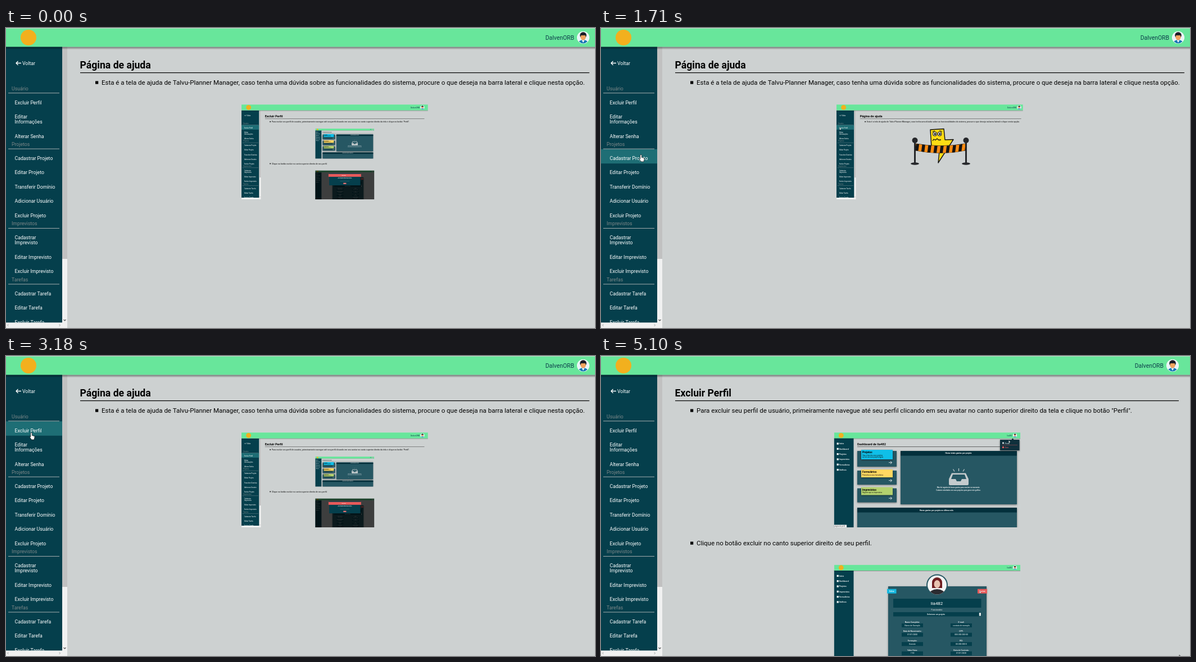
An HTML page with a canvas that plays this animation: 1048 px wide and 534 px high, repeating every 5.18 s.

```html
<!DOCTYPE html>
<html lang="pt">
<head>
<meta charset="utf-8">
<title>Página de ajuda</title>
<style>
html, body { margin: 0; width: 100%; height: 100%; overflow: hidden; background: #cdd1d1; }
canvas { display: block; width: 100%; height: 100%; }
</style>
</head>
<body>
<canvas id="stage" width="1048" height="534"></canvas>
<script>
const g = document.getElementById('stage').getContext('2d');
const W = 1048, H = 534, LOOP = 5180, STEP = 77.4;
const K = 0.3166; // an embedded screen relative to the page
const BG = '#cdd1d1', DARK = '#053f4c', TEAL = '#265763', DEEP = '#04303c', RED = '#e85a5a', GREEN = '#68e69b';
const USER = 'DalvenORB', MEMBER = 'lia482';

const MENU = [
  ['Usuário', 'Excluir Perfil', 'Editar|Informações', 'Alterar Senha'],
  ['Projetos', 'Cadastrar Projeto', 'Editar Projeto', 'Transferir Domínio', 'Adicionar Usuário', 'Excluir Projeto'],
  ['Imprevistos', 'Cadastrar|Imprevisto', 'Editar Imprevisto', 'Excluir Imprevisto'],
  ['Tarefas', 'Cadastrar Tarefa', 'Editar Tarefa', 'Excluir Tarefa']
];

// time, x, y of the pointer tip
const POINTER = [
  [77, 962, 520], [542, 198, 250], [700, 130, 215], [774, 107, 197], [851, 104, 190], [1083, 95.5, 174],
  [1400, 88, 168], [1620, 78, 195], [1703, 71, 225.5], [1900, 66, 290], [2100, 60, 328], [2250, 58, 330],
  [2399, 52, 253], [2560, 48, 215], [2710, 46, 168], [2787, 45, 137], [2940, 41, 136], [3173, 45, 136.5],
  [3484, 45, 136.5], [3560, 60, 150], [3793, 283, 207], [4010, 480, 290], [4560, 990, 512],
  [4650, 1010, 525], [5108, 1029, 532]
];
const MINI_POINTER = [[1080, 921, 493], [1400, 300, 260], [1620, 19, 130]];

const HAND = new Path2D('M0 0C1.2 0 1.4 1 1.4 2V5L5 6C6 6.4 6.2 7 6 8L5 12.5H.5L-2.4 8.4C-3.2 7-2.2 6.6-1.2 7.6V2C-1.2.8-1 0 0 0Z');
const ARROW = new Path2D('M0 0V9L2.2 7.2L3.8 10.6L5.2 10L3.7 6.7H6.4Z');

function rect(x, y, w, h, color) {
  g.fillStyle = color;
  g.fillRect(x, y, w, h);
}

function disc(x, y, r, color) {
  g.fillStyle = color;
  g.beginPath();
  g.arc(x, y, r, 0, 7);
  g.fill();
}

function text(str, x, y, size, color, align = 'left', weight = 400) {
  g.font = `${weight} ${size}px Roboto, sans-serif`;
  g.fillStyle = color;
  g.textAlign = align;
  g.fillText(str, x, y);
}

function trace(points, close) {
  g.beginPath();
  points.forEach(([x, y]) => g.lineTo(x, y));
  if (close) g.closePath();
}

function line(points, color, width) {
  trace(points);
  g.strokeStyle = color;
  g.lineWidth = width;
  g.stroke();
}

function box(x, y, w, h, color) {
  g.save();
  g.shadowColor = 'rgba(0,0,0,.45)';
  g.shadowBlur = 3;
  g.shadowOffsetY = 1;
  rect(x, y, w, h, color);
  g.restore();
}

function screen(x, y, paint) {
  g.save();
  g.translate(x, y);
  g.scale(K, K);
  g.beginPath();
  g.rect(0, 0, W, H);
  g.clip();
  paint();
  g.restore();
}

function pointAt(keys, t) {
  if (t < keys[0][0] - 1) return null;
  const i = keys.findIndex(k => k[0] > t);
  if (i < 0) return keys[keys.length - 1].slice(1);
  if (i === 0) return keys[0].slice(1);
  const [t0, x0, y0] = keys[i - 1], [t1, x1, y1] = keys[i];
  const p = (t - t0) / (t1 - t0);
  return [x0 + (x1 - x0) * p, y0 + (y1 - y0) * p];
}

function pointer(x, y, shape, scale = 1) {
  g.save();
  g.translate(x, y);
  g.scale(scale, scale);
  g.fillStyle = '#fff';
  g.fill(shape);
  g.strokeStyle = '#111';
  g.lineWidth = 0.7;
  g.stroke(shape);
  g.restore();
}

function avatar(x) {
  g.save();
  disc(x, 17, 11, '#fff');
  g.beginPath();
  g.arc(x, 17, 10.4, 0, 7);
  g.clip();
  rect(x - 11, 6, 22, 22, '#e9f3f8');
  g.fillStyle = '#1877b5';
  g.beginPath();
  g.ellipse(x, 28, 9, 7, 0, 0, 7);
  g.fill();
  trace([[x - 2.5, 21.5], [x + 2.5, 21.5], [x, 26]], true);
  g.fillStyle = '#fff';
  g.fill();
  disc(x, 13, 5.8, '#1d1d26');
  g.fillStyle = '#f3a45f';
  g.beginPath();
  g.ellipse(x, 16.2, 4.6, 5.2, 0, 0, 7);
  g.fill();
  rect(x - 4.6, 9.5, 9, 3.6, '#1d1d26');
  g.restore();
}

function header(name, x) {
  const shade = g.createLinearGradient(0, 33.5, 0, 38.5);
  shade.addColorStop(0, 'rgba(0,0,0,.45)');
  shade.addColorStop(1, 'rgba(0,0,0,0)');
  rect(0, 33.5, W, 5, shade);
  rect(0, 0, W, 33.5, GREEN);
  rect(0, 0, W, 0.8, '#d3dad6');
  disc(40, 17, 14, '#f2b01e');
  text(name, x - 16, 21, 10.4, '#0b3d4a', 'right');
  avatar(x);
}

function sidebar(cur, focused) {
  g.save();
  g.beginPath();
  g.rect(0, 33, 100, 491.5);
  g.clip();
  rect(0, 33, 100, 492, DARK);
  line([[27, 62.5], [18, 62.5]], '#fff', 1.3);
  line([[21.5, 59], [18, 62.5], [21.5, 66]], '#fff', 1.3);
  text('Voltar', 29, 66.2, 8.73, '#fff');
  let y = 116.3;
  MENU.forEach(([title, ...items], group) => {
    text(title, 10, y - 5.8, 8.73, '#7d8788');
    const top = y;
    items.forEach((item, i) => {
      const lines = item.split('|');
      const h = lines.length > 1 ? 34.5 : 25.5;
      const over = cur && cur[0] < 100 && cur[1] >= y && cur[1] < y + h;
      if (over || (focused && group + i === 0)) rect(0, y, 100, h, '#1e6e75');
      lines.forEach((s, n) => {
        text(s, 15.5, y + h / 2 + 6.5 + (n - (lines.length - 1) / 2) * 8.9, 8.73, '#fff');
      });
      y += h;
    });
    rect(4, top - 1.1, 91, 1.1, '#97a3a5');
    y += 13.9;
  });
  g.restore();

  const grabbed = cur && cur[0] >= 100 && cur[0] < 109;
  rect(100, 33, 9, 492, '#f1f1f1');
  rect(100, 33, 9, 378, grabbed ? '#a8a8a8' : '#c1c1c1');
  rect(0, 524.5, 109, 9.5, '#f1f1f1');
  line([[102.5, 519], [104.5, 521], [106.5, 519]], '#505050', 1.1);
  line([[4.5, 527], [2.5, 529], [4.5, 531]], '#a3a3a3', 1);
  line([[94.5, 527], [96.5, 529], [94.5, 531]], '#a3a3a3', 1);
}

function heading(str, ruleEnd) {
  text(str, 131.6, 72, 17.6, '#000', 'left', 700);
  rect(132, 79, ruleEnd - 132, 1.2, '#000');
}

function bullet(str, y) {
  rect(159, y - 2.5, 5.2, 5.2, '#000');
  text(str, 170, y + 4, 11.49, '#000');
}

// Frame shared by both embedded screens
function shell() {
  g.beginPath();
  g.rect(414.6, 136, W * K, H * K);
  g.clip();
  rect(414, 136, 333, 170, BG);
  rect(414.6, 146, 34.9, 160, DARK);
  ['Início', 'Dashboard', 'Projetos', 'Imprevistos', 'Formulários', 'Gráficos'].forEach((s, i) => {
    const y = 156 + i * 9.3;
    rect(419.6, y - 1.6, 3.2, 3.2, '#fff');
    text(s, 423.7, y + 1.3, 3.5, '#fff', 'left', 500);
  });
  screen(414.6, 136, () => header(MEMBER, 1017));
}

function taskCard(y, h, color, title, lines) {
  box(456, y, 70, h, TEAL);
  box(463, y - 2, 56, lines.length > 1 ? 17 : 14, color);
  text(title, 465, y + 4, 4.7, '#000', 'left', 700);
  lines.forEach((s, i) => text(s, 465, y + 8.5 + i * 3, 2.8, '#111'));
  const a = y + h - 7.3;
  line([[512, a], [517.5, a]], '#fff', 0.8);
  line([[515, a - 2.4], [517.5, a], [515, a + 2.4]], '#fff', 0.8);
}

function tray() {
  g.fillStyle = '#c4cbcd';
  g.beginPath();
  g.roundRect(619, 218, 35, 12, 2);
  g.fill();
  trace([[624, 208.5], [649, 208.5], [654, 219], [619, 219]], true);
  g.fill();
  trace([[626, 211], [647, 211], [650, 219], [642, 219], [640, 223], [633, 223], [631, 219], [623, 219]], true);
  g.fillStyle = TEAL;
  g.fill();
  [[626.5, 201.5, 629, 205.5], [636.5, 200, 636.5, 205], [646.5, 201.5, 644, 205.5]]
    .forEach(([a, b, c, d]) => line([[a, b], [c, d]], '#c4cbcd', 1.2));
}

function dashboard(menuOpen, cur) {
  text('Dashboard de ' + MEMBER, 456, 158.5, 5.5, '#000', 'left', 700);
  rect(456, 161.4, 284, 0.6, '#222');
  taskCard(169, 28, '#0fbfe8', 'Projetos', ['Veja a lista dos seus projetos', 'ou crie um novo projeto agora']);
  taskCard(204, 25, '#ffd761', 'Formulários', ['Preencha os seus formulários']);
  taskCard(235.5, 25, '#b3d16e', 'Imprevistos', ['Registre aqui os imprevistos']);

  box(533, 169, 207, 95, TEAL);
  rect(533, 169, 207, 8.5, DEEP);
  text('Horas totais gastas por projeto', 636, 174.4, 3.4, '#fff', 'center', 700);
  tray();
  text('Não há registro de horas gastas para mostrar no momento.', 636, 235, 2.9, '#fff', 'center', 500);
  text('Cadastre atividades em seus projetos para gerar este gráfico.', 636, 239.5, 2.9, '#fff', 'center', 500);
  box(456, 270, 284, 36, TEAL);
  rect(456, 270, 284, 8.5, DEEP);
  text('Horas gastas por projeto no último mês', 597, 275.6, 3.4, '#fff', 'center', 700);

  if (menuOpen) {
    trace([[730, 149.5], [732.5, 146.5], [735, 149.5]], true);
    g.fillStyle = '#10303c';
    g.fill();
    box(710, 149, 34.5, 19, '#10303c');
    disc(715.5, 155, 1.4, '#fff');
    text('Perfil', 718.5, 156.6, 3.8, '#fff');
    rect(713, 158.6, 28, 0.4, RED);
    disc(715.5, 162.5, 1.7, RED);
    text('Sair', 718.5, 164, 3.8, RED);
    rect(414.6, 300.5, 22.5, 4.5, '#f4f4f4');
    text('página do perfil', 415.6, 303.6, 2.7, '#444');
    pointer(726, 150, HAND, K);
  } else if (cur) {
    pointer(cur[0], cur[1], ARROW, K);
  }
}

function button(x, y, w, h, color, label) {
  rect(x, y, w, h, color);
  text(label, x + w / 2, y + h / 2 + 1.3, 3.5, '#fff', 'center', 500);
}

// Drawn in place of the second embedded screen
function profile(modal) {
  box(511, 410, 175, 140, TEAL);
  disc(598, 407.5, 19, TEAL);
  g.save();
  disc(598, 407.5, 17, '#f4f4f4');
  g.beginPath();
  g.arc(598, 407.5, 17, 0, 7);
  g.clip();
  disc(598, 403, 9, '#6f1d20');
  rect(589, 403, 18, 10, '#6f1d20');
  g.fillStyle = '#e9c3b0';
  g.beginPath();
  g.ellipse(598, 406, 5.5, 7, 0, 0, 7);
  g.fill();
  g.fillStyle = '#2b2b30';
  g.beginPath();
  g.ellipse(598, 424, 14, 9, 0, 0, 7);
  g.fill();
  g.restore();
  button(509, 414.7, 16.5, 8, '#16b8e0', 'Editar');
  button(670, 414.7, 17, 8, RED, 'Excluir');

  rect(520, 432, 156.5, 16, DARK);
  text(MEMBER, 597.5, 443, 8, '#fff', 'center');
  text('Funcionário', 597.5, 453.3, 3.8, '#fff', 'center');
  rect(520, 456, 156.5, 7.5, DARK);
  text('Selecione um projeto', 596, 461, 3.4, '#fff', 'center', 500);
  rect(672.8, 457, 3.2, 5.6, '#dfe5e5');
  [
    ['Nome Completo:', 'Nome de Exemplo', 'E-mail:', 'contato de exemplo'],
    ['Data de Nascimento:', '01/01/2000', 'CPF:', '000.000.000-00'],
    ['Formação:', 'Gerente', 'RG:', '00.000.000-0'],
    ['Valor Hora:', '7.50', 'Data de Contrato:', '01/01/2020']
  ].forEach((row, i) => {
    const y = 476 + i * 16.6;
    [554, 641].forEach((x, n) => {
      text(row[n * 2], x, y - 1.2, 3.5, '#fff', 'center', 500);
      rect(x - 19, y, 38, 7, DARK);
      text(row[n * 2 + 1], x, y + 4.6, 3.4, '#fff', 'center');
    });
  });

  if (!modal) {
    pointer(674, 418, HAND, K);
    return;
  }
  rect(414, 371, 333, 170, 'rgba(0,0,0,.7)');
  rect(493, 387.5, 175, 67.5, DARK);
  rect(489, 391, 183, 16, RED);
  text('Exclusão', 575, 401, 5.6, '#fff', 'center', 700);
  text('×', 665, 400.8, 4.5, '#9c3038', 'center');
  text('Tem certeza que deseja excluir sua conta?', 580.5, 413.7, 4, '#fff', 'center');
  text('Caso sim, digite confirmar e clique em excluir', 580.5, 418, 4, '#fff', 'center');
  rect(554, 431, 53, 0.6, '#c5d0d2');
  button(572, 441, 17, 7, RED, 'Excluir');
}

function helpBody(media) {
  heading('Página de ajuda', 1038);
  bullet('Esta é a tela de ajuda de Talvu-Planner Manager, caso tenha uma dúvida sobre as funcionalidades do sistema, procure o que deseja na barra lateral e clique nesta opção.', 97);
  if (media) media();
}

function profileBody(s) {
  heading('Excluir Perfil', 1028);
  bullet('Para excluir seu perfil de usuário, primeiramente navegue até seu perfil clicando em seu avatar no canto superior direito da tela e clique no botão "Perfil".', 97);
  bullet('Clique no botão excluir no canto superior direito de seu perfil.', 333);
  g.save();
  shell();
  dashboard(s.menuOpen, s.dashCur);
  g.restore();
  if (!s.second) return;
  g.save();
  g.translate(0, 235.4);
  shell();
  g.translate(0, -235.4);
  profile(s.modal);
  g.restore();
}

function page(s) {
  rect(0, 0, W, H, BG);
  if (s.perfil) profileBody(s);
  else helpBody(s.media);
  sidebar(s.cur, s.focused);
  header(USER, s.perfil ? 1017 : 1027);
  if (s.cur) pointer(s.cur[0], s.cur[1], s.cur[0] < 100 ? HAND : ARROW);
}

function bolt() {
  g.lineJoin = 'round';
  trace([[586, 181], [610, 179.5], [612, 199], [627, 198.5], [600, 240], [602, 219], [588, 212]], true);
  g.fillStyle = '#ffdc14';
  g.fill();
  g.strokeStyle = '#111';
  g.lineWidth = 1.4;
  g.stroke();
  [594, 602.5].forEach(x => {
    disc(x, 188.5, 3.9, '#111');
    disc(x, 188.5, 2.9, '#e8e8e0');
    disc(x + 0.3, 188.8, 1.8, '#111');
  });
  line([[589.5, 185], [594, 183]], '#111', 1);
  line([[602, 182.5], [607, 184.5]], '#111', 1);
  line([[590, 201], [592, 198], [595, 199.5], [598, 197], [601, 199.5], [605, 199]], '#111', 1.3);

  [558.5, 649.5].forEach(x => {
    disc(x, 200, 5, '#26282b');
    rect(x - 1.5, 203, 3, 38, '#26282b');
    g.beginPath();
    g.ellipse(x, 241.5, 7.5, 2.2, 0, 0, 7);
    g.fill();
  });

  g.save();
  g.beginPath();
  g.moveTo(560, 206);
  g.quadraticCurveTo(604, 213.5, 648, 206);
  g.lineTo(648, 218);
  g.quadraticCurveTo(604, 227, 560, 218);
  g.closePath();
  g.strokeStyle = '#111';
  g.lineWidth = 1;
  g.stroke();
  g.clip();
  rect(558, 204, 92, 22, '#ff8c12');
  for (let x = 561; x < 655; x += 11) {
    trace([[x, 204], [x + 5.5, 204], [x + 2.5, 226], [x - 3, 226]], true);
    g.fillStyle = '#151515';
    g.fill();
  }
  g.restore();
}

function mini(t, snapped) {
  const perfil = t < 850 || t >= 2950;
  screen(419, 136, () => page({
    perfil,
    focused: perfil,
    second: true,
    modal: t < 390 || t >= 2950,
    menuOpen: t >= 620 && t < 850,
    dashCur: t >= 2950 ? [602, 251] : null,
    cur: perfil ? null : pointAt(MINI_POINTER, snapped)
  }));
  if (!perfil) bolt();
}

function draw(now) {
  const t = now % LOOP;
  const snapped = Math.floor((t + 9) / STEP) * STEP;
  g.setTransform(1, 0, 0, 1, 0, 0);
  page({
    perfil: t >= 3270,
    focused: t >= 3270 && t < 4940,
    second: t >= 3560,
    modal: t < 4320,
    menuOpen: t >= 4780,
    dashCur: [727, 188],
    cur: pointAt(POINTER, snapped),
    media: () => mini(t, snapped)
  });
}

const start = performance.now();
function tick() {
  draw(performance.now() - start);
  requestAnimationFrame(tick);
}
tick();
</script>
</body>
</html>
```
